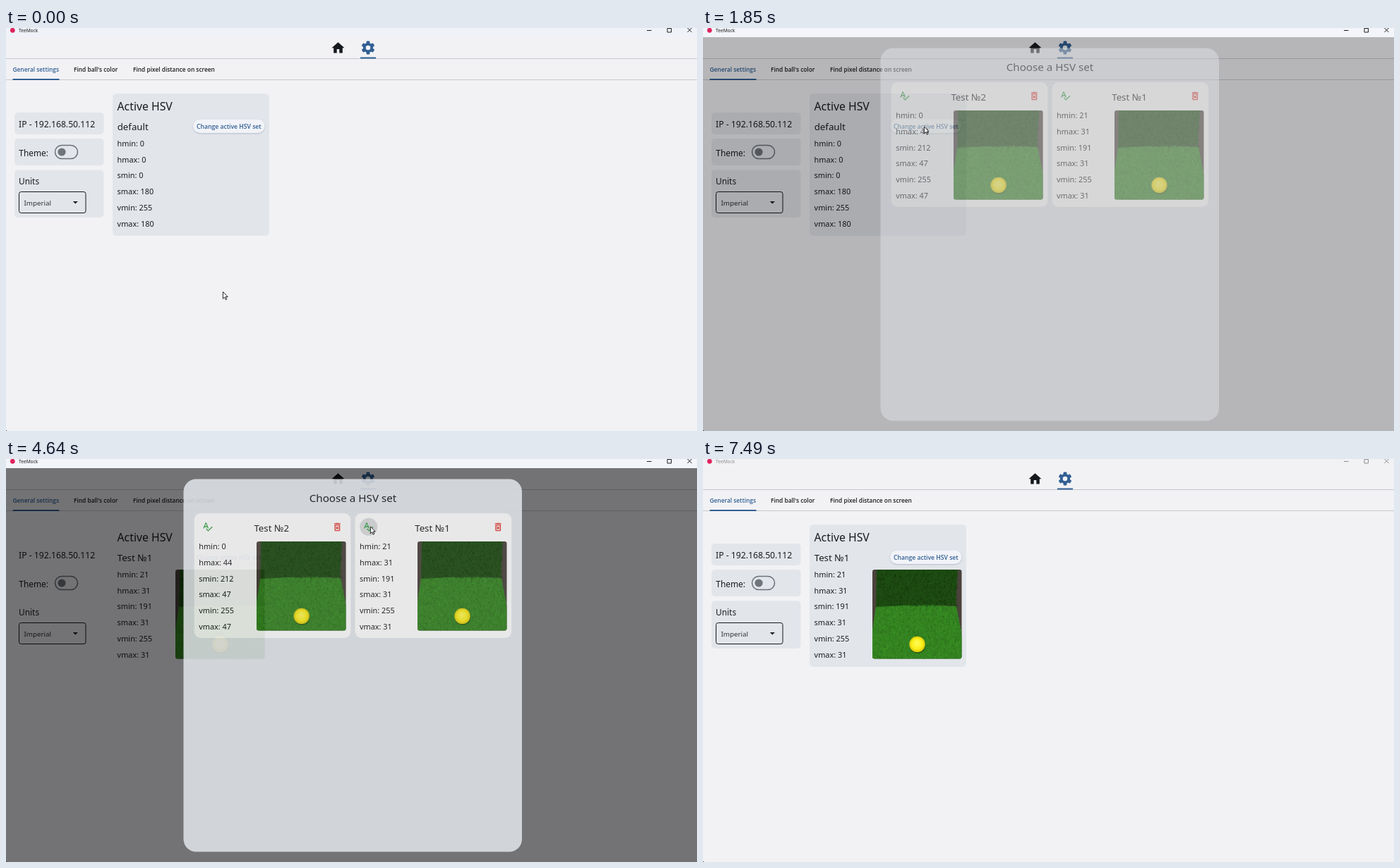
An HTML page with a canvas that plays this animation: 979x572 px, repeating every 7.51 s.

```html
<!DOCTYPE html>
<html lang="en">
<head>
<meta charset="utf-8">
<title>HSV settings</title>
<style>
html, body { margin: 0; width: 100%; height: 100%; overflow: hidden; background: #f2f2f5; }
canvas { display: block; }
</style>
</head>
<body>
<canvas id="stage" width="979" height="572"></canvas>
<script>
const W = 979, H = 572, LOOP = 7510;
const INK = '#1a1c1e', BLUE = '#315f93', CARD = '#e2e5ea', PAGE = '#f2f2f5';
const screen = document.getElementById('stage').getContext('2d');
let g = screen;

// Runs paint on its own canvas, which can then be composited as one unit.
function layer(w, h, paint) {
  const canvas = document.createElement('canvas');
  canvas.width = w;
  canvas.height = h;
  const previous = g;
  g = canvas.getContext('2d');
  paint();
  g = previous;
  return canvas;
}

function rect(x, y, w, h, color) {
  g.fillStyle = color;
  g.fillRect(x, y, w, h);
}

function box(x, y, w, h, r, fill, stroke, line = 1) {
  g.beginPath();
  g.roundRect(x, y, w, h, r);
  if (fill) { g.fillStyle = fill; g.fill(); }
  if (stroke) { g.strokeStyle = stroke; g.lineWidth = line; g.stroke(); }
}

function disc(x, y, r, color) {
  g.beginPath();
  g.arc(x, y, r, 0, 7);
  g.fillStyle = color;
  g.fill();
}

function text(str, x, y, size, color = INK, semibold = false) {
  g.font = semibold ? `600 ${size}px "Open Sans", sans-serif` : `${size}px "Noto Sans", sans-serif`;
  g.fillStyle = color;
  g.fillText(str, x, y);
}

function shape(path, x, y, scale, fill, stroke) {
  g.save();
  g.translate(x, y);
  g.scale(scale, scale);
  g.fillStyle = fill;
  g.fill(path, 'evenodd');
  if (stroke) {
    g.strokeStyle = stroke;
    g.lineWidth = 0.9;
    g.lineJoin = 'round';
    g.stroke(path);
  }
  g.restore();
}

const HOME = new Path2D('M10 20v-6h4v6h5v-8h3L12 3 2 12h3v8z');
const CHECK = new Path2D('M12.45 16h2.09L9.43 3H7.57L2.46 16h2.09l1.12-3h5.64l1.14 3zm-6.02-5L8.5 5.48 10.57 11H6.43zm15.16.59l-8.09 8.09L9.83 16l-1.41 1.41 5.09 5.09L23 13z');
const TRASH = new Path2D('M14.12 10.47L12 12.59l-2.13-2.12-1.41 1.41L10.59 14l-2.12 2.12 1.41 1.41L12 15.41l2.12 2.12 1.41-1.41L13.41 14l2.12-2.12zM15.5 4l-1-1h-5l-1 1H5v2h14V4zM6 19c0 1.1.9 2 2 2h8c1.1 0 2-.9 2-2V7H6zM8 9h8v10H8z');
const ARROW = new Path2D('M.4.4V10.3L2.7 8.1 4.3 11.7 5.8 11 4.2 7.5H7.2z');
const HAND = new Path2D('M3.3 8.5V1.5a1 1 0 0 1 2 0V5.6a1 1 0 0 1 1.9.3a1 1 0 0 1 1.8.4a.9.9 0 0 1 1.7.6V10q0 2-1.3 4H4.5Q2.8 11.5.6 9a1 1 0 0 1 1.6-1.2z');

function gear(x, y) {
  g.save();
  g.translate(x, y);
  g.strokeStyle = BLUE;
  g.lineWidth = 3.8;
  g.beginPath();
  g.arc(0, 0, 5.2, 0, 7);
  g.stroke();
  for (let i = 0; i < 6; i++) {
    g.rotate(Math.PI / 3);
    box(-2.4, -9.4, 4.8, 4.4, 0.8, BLUE);
  }
  g.restore();
}

// Two strips of artificial turf with a ball.
const turf = layer(127, 127, () => {
  let seed = 7;
  const random = () => (seed = (seed * 16807) % 2147483647) / 2147483647;
  g.beginPath();
  g.roundRect(0, 0, 126.5, 126.5, 3);
  g.clip();
  rect(0, 0, 127, 127, '#4a423b');
  g.fillStyle = '#348322';
  g.fill(new Path2D('M5 52Q62 47 119 52L127 95V127H0V85z'));
  g.fillStyle = '#1d4b12';
  g.fill(new Path2D('M6 0H121L118 51Q62 49 5 53z'));
  for (let i = 0; i < 3800; i++) {
    const x = random() * 127, y = random() * 127, light = random();
    const inset = y < 52 ? 6 : Math.max(0, 6 - (y - 52) / 6);
    if (x < inset || x > 126 - inset) continue;
    const level = y < 51 ? 36 + light * 60 : 88 + light * 88;
    rect(x, y, 1, 1 + random() * 2, `rgba(${level * 0.4},${level},${level * 0.24},.55)`);
  }
  disc(64, 107.5, 11.4, 'rgba(20,60,10,.5)');
  const glow = g.createRadialGradient(63, 104, 1, 63.5, 106, 11.2);
  glow.addColorStop(0, '#fffa55');
  glow.addColorStop(0.65, '#fbee18');
  glow.addColorStop(1, '#d9c80c');
  disc(63.5, 106, 11.2, glow);
});

function values(list, x, y) {
  ['hmin', 'hmax', 'smin', 'smax', 'vmin', 'vmax'].forEach((name, i) =>
    text(`${name}: ${list[i]}`, x, y + i * 22.8, 10.9));
}

function changeButton(raised) {
  g.save();
  g.shadowColor = raised ? 'rgba(40,60,100,.5)' : 'rgba(40,60,100,.28)';
  g.shadowBlur = raised ? 4 : 2;
  g.shadowOffsetY = raised ? 1.5 : 0.8;
  box(265, 129.5, 101.5, 19.5, 9.75, raised ? '#e6ebf3' : '#f1f3f8');
  g.restore();
  text('Change active HSV set', 270, 142.5, 8.65, BLUE, true);
}

function page(set, { flat = false, raised = false } = {}) {
  return layer(W, H, () => {
    rect(0, 0, W, H, PAGE);
    shape(HOME, 459.7, 17.5, 0.9, '#15181c');
    gear(513, 28);
    rect(0, 43, W, 1, '#c6c8cd');
    rect(502, 41.5, 22, 2, BLUE);
    text('General settings', 9.5, 62, 8.35, BLUE, true);
    text("Find ball's color", 96, 62, 8.35, INK, true);
    text('Find pixel distance on screen', 180, 62, 8.35, INK, true);
    rect(0, 73, W, 1, '#c6c8cd');
    rect(9.5, 72, 66, 2, BLUE);

    if (!flat) {
      box(12, 120, 126.5, 31, 5, CARD);
      box(12, 157, 126.5, 38, 5, CARD);
      box(12, 201.5, 126.5, 67.5, 5, CARD);
      box(151, 93, 222, 202, 6, CARD);
    }
    text('IP - 192.168.50.112', 18, 140.5, 12.2);
    text('Theme:', 18.3, 181.5, 11.9);
    box(69.5, 166.5, 32, 19, 9.5, null, '#6c7077', 1.5);
    disc(79, 176, 5.6, '#70747b');
    text('Units', 18, 221.8, 11.9);
    box(18.5, 232.5, 94.5, 30, 3, null, '#17191b');
    text('Imperial', 25.5, 252, 9.8, '#303337');
    shape(new Path2D('M-3.5-1.7H3.5L0 1.8z'), 98.3, 247.8, 1, INK);

    text('Active HSV', 157.5, 117, 15.8);
    text(set.name, 157.7, 145, 13.25);
    values(set.values, 157.6, 167.7);
    if (set.photo) g.drawImage(turf, 240, 157);
    changeButton(raised);
  });
}

function setCard(x, set, highlight) {
  box(x, 77, 221.7, 177, 9, '#fff');
  if (highlight) disc(x + 19.3, 96.3, 12.5, `rgba(40,48,60,${highlight})`);
  shape(CHECK, x + 11, 88.2, 0.65, '#35a345');
  text(set.name, x + 84.7, 102.5, 13.25);
  shape(TRASH, x + 194.9, 88.7, 0.65, '#e53a34');
  values(set.values, x + 6.5, 128);
  g.drawImage(turf, x + 88.5, 117);
}

function dialog(highlight) {
  return layer(W, H, () => {
    box(251.5, 28.5, 479.5, 529, 18, '#e4e7ec');
    text('Choose a HSV set', 429.7, 60.7, 15.2);
    setCard(266.7, sets.second);
    setCard(494.5, sets.first, highlight);
  });
}

const sets = {
  initial: { name: 'default', values: [0, 0, 0, 180, 255, 180] },
  first: { name: 'Test №1', values: [21, 31, 191, 31, 255, 31], photo: true },
  second: { name: 'Test №2', values: [0, 44, 212, 47, 255, 47], photo: true }
};

const pages = {
  initial: page(sets.initial),
  hovered: page(sets.initial, { raised: true }),
  flat: page(sets.first, { flat: true }),
  chosen: page(sets.first)
};
const dialogs = { idle: dialog(0), hover: dialog(0.08), pressed: dialog(0.17) };

// start time, page, barrier opacity, dialog opacity, dialog state
const phases = [
  [0, 'initial', 0, 0, 'idle'],
  [1580, 'hovered', 0, 0, 'idle'],
  [1730, 'hovered', 0.004, 0, 'idle'],
  [1850, 'initial', 0.25, 0.45, 'idle'],
  [2000, 'initial', 0.54, 1, 'idle'],
  [3310, 'initial', 0.54, 1, 'hover'],
  [4640, 'flat', 0.52, 0.84, 'pressed'],
  [4790, 'chosen', 0, 0, 'idle']
];

// start time, x, y of the pointer
const pointer = [
  [0, 307, 374], [130, 308, 374], [250, 309, 373], [400, 315, 370],
  [650, 318, 367], [800, 325, 366], [920, 342, 364], [1070, 372, 317],
  [1190, 432, 190], [1340, 380, 165], [1460, 330, 148], [1580, 310, 140],
  [1850, 313, 139.5], [2540, 334, 166], [2690, 358, 190], [2810, 412, 203],
  [2930, 477, 188], [3050, 523, 150], [3190, 526, 120], [3310, 513, 103],
  [3460, 512, 96], [4640, 516, 95.5], [4940, 537, 119], [5090, 564, 162],
  [5250, 590, 217], [5370, 620, 288], [5500, 642, 345], [5620, 652, 368],
  [5770, 653.5, 369], [5920, 653, 370], [6360, 671, 379], [6510, 741, 423],
  [6660, 835, 493], [6780, 921, 560], [6930, 1000, 600]
];

const at = (list, t) => list.findLast(([start]) => start <= t);
const isHand = t => (t >= 1580 && t < 1850) || (t >= 3310 && t < 4640);

function titleBar(active, modal) {
  const ink = active ? INK : '#8b8d92';
  rect(0, 0, W, 13, !active ? PAGE : modal ? '#f3f5fa' : '#eff3f9');
  disc(9.3, 3.3, 3.4, '#e0245e');
  text('TeeMock', 18, 6.3, 6.6, ink);
  g.strokeStyle = ink;
  g.lineWidth = 1;
  g.stroke(new Path2D('M908 3.5h6.5M937 .5h5.5v5.5h-5.5zM965.5 0l6 6M971.5 0l-6 6'));
}

function draw(t) {
  const [, pageName, barrier, opacity, state] = at(phases, t);
  g.drawImage(pages[pageName], 0, 0);
  rect(0, 13, W, H, `rgba(0,0,0,${barrier})`);
  titleBar(t < 7490, opacity > 0);
  g.globalAlpha = opacity;
  g.drawImage(dialogs[state], 0, 0);
  g.globalAlpha = 1;
  rect(0, 571, 1, 1, '#333');
  const [, x, y] = at(pointer, t);
  shape(isHand(t) ? HAND : ARROW, x, y, 1, '#fff', '#111');
}

function tick() {
  draw(performance.now() % LOOP);
  requestAnimationFrame(tick);
}
tick();
</script>
</body>
</html>
```
